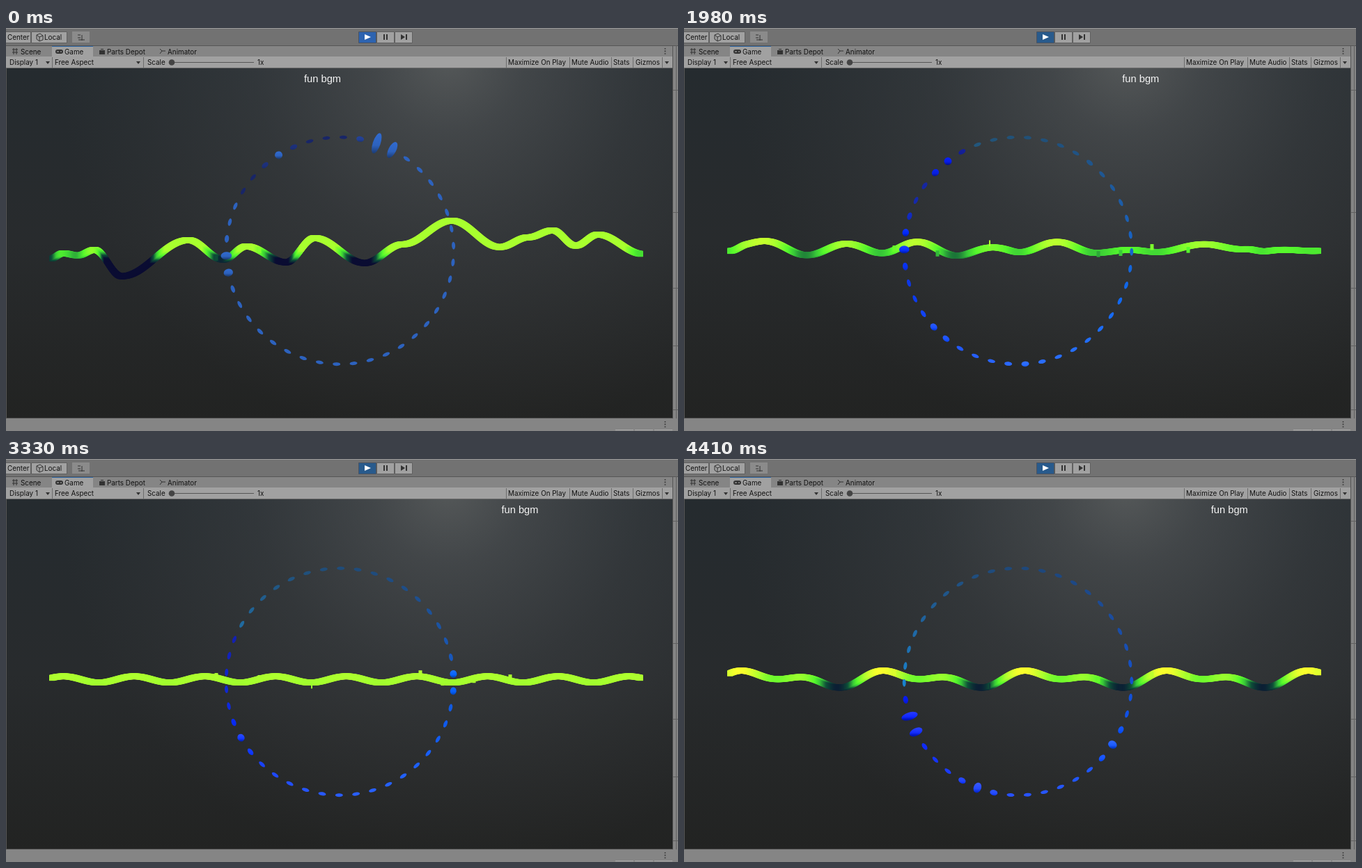
An HTML page with a canvas for the animation above (4500 ms loop, 965 by 580 pixels).

```html
<!DOCTYPE html>
<html lang="en">
<head>
<meta charset="utf-8">
<style>
html, body { margin: 0; width: 100%; height: 100%; overflow: hidden; background: #868686; }
canvas, svg { position: absolute; left: 0; top: 0; width: 965px; height: 580px; display: block; }
text { font: 9.9px Inter, sans-serif; fill: #111; }
#title { font: 14.7px "Liberation Sans", Arial, sans-serif; fill: #f4f4f4; }
</style>
</head>
<body>
<canvas id="scene" width="965" height="580"></canvas>
<svg viewBox="0 0 965 580">
  <path d="M0 0H965V58H0ZM0 562H965V580H0ZM957 25H965V580H957Z" fill="#858585"/>
  <path d="M0 0H965V25H0Z" fill="#727272"/>
  <path d="M0 0H965V1H0Z" fill="#9b9b9b"/>
  <path d="M0 25.5H965M957.5 25V562M0 561.5H957M.5 58V562" stroke="#555" fill="none"/>
  <path d="M66 26H125V42H66ZM0 41H957V57H0Z" fill="#a1a1a1"/>
  <path d="M-1 5.5H35.5V21.5H-1ZM36.5 5.5H87.5V21.5H36.5ZM532.5 5.5H557.5V21.5H532.5ZM558.5 5.5H583.5V21.5H558.5Z" fill="#a1a1a1" stroke="#606060"/>
  <path d="M95 5H120V21H95Z" fill="#8b8b8b"/>
  <path d="M0 57.5H957M66.5 42V57M197.5 42V57M718.5 42V57M809.5 42V57M869.5 42V57M900.5 42V57M942.5 42V57" stroke="#6c6c6c" fill="none"/>
  <path d="M958 89.5H965M958 265.5H965M958 374.5H965M958 457.5H965M958 549.5H965M962.5 25V562" stroke="#606060" fill="none"/>
  <path d="M66 26.5H125" stroke="#2d66a5"/>
  <path id="play" d="M506.5 5.5H531.5V21.5H506.5Z" stroke="#4a5360"/>
  <path d="M515 9L524 13L515 17Z" fill="#fff"/>
  <path d="M542 9H544V17H542ZM546 9H548V17H546ZM567 9L573 13L567 17ZM574 9H576V17H574Z" fill="#333"/>
  <path d="M57 48H63L60 52ZM187 48H193L190 52ZM946 48H952L949 52Z" fill="#333"/>
  <path d="M9 31H17M9 35H17M11 29V38M15 29V38M103 10H107M103 14H107M109 10V18M104 17H113M44 10L49 8L53 11V17L48 19L44 16ZM44 10L48 13L53 11M48 13V19M221 30L224 33L221 37M224 33H229" stroke="#333" fill="none"/>
  <path d="M134 32H142V38H134ZM136 30H140V31H136Z" fill="#333"/>
  <rect x="71" y="31" width="11" height="6" rx="3" fill="#333"/>
  <path d="M73 34H76M78 34H80" stroke="#bbb"/>
  <path d="M238 49.5H356" stroke="#555"/>
  <circle cx="238" cy="49.5" r="4.3" fill="#444"/>
  <path d="M946.5 29V38M946.5 566V575" stroke="#333" stroke-width="1.6" stroke-dasharray="1.6 2"/>
  <path d="M875 578.5H958" stroke="#aaa" stroke-dasharray="26 2"/>
  <text x="2" y="17">Center</text><text x="55" y="17">Local</text>
  <text x="21" y="37.5">Scene</text><text x="84" y="37.5">Game</text>
  <text x="145" y="37.5">Parts Depot</text><text x="232" y="37.5">Animator</text>
  <text x="5" y="53">Display 1</text><text x="70" y="53">Free Aspect</text>
  <text x="203" y="53">Scale</text><text x="361" y="53">1x</text>
  <text x="721" y="53">Maximize On Play</text><text x="812" y="53">Mute Audio</text>
  <text x="872" y="53">Stats</text><text x="904" y="53">Gizmos</text>
  <text id="title" y="78">fun bgm</text>
</svg>
<script>
const LOOP = 4500, STEP = 90, BEADS = 42, MID = 317;
const ctx = document.getElementById('scene').getContext('2d');
const title = document.getElementById('title');
const play = document.getElementById('play');
const mix = (a, b, u) => a + (b - a) * u;
const clamp = (v, a, b) => Math.min(b, Math.max(a, v));
const ease = u => (1 - Math.cos(Math.PI * u)) / 2;
const rand = n => { const v = Math.sin(n * 127.1) * 43758.5453; return v - Math.floor(v); };

// One crest of a periodic wave, highest at x = peak
const crest = (x, size, period, peak) => -size * Math.cos(2 * Math.PI * (x - peak) / period);

// Eased path through peaks and troughs
const through = points => x => {
  const i = clamp(points.findIndex(p => p[0] > x), 1, points.length - 1);
  const [x0, y0] = points[i - 1], [x1, y1] = points[i];
  return mix(y0, y1, ease(clamp((x - x0) / (x1 - x0), 0, 1)));
};

// wave: line height; gain, shift, top: how height becomes colour; humps: [bead, swelling]
const keys = [
  { t: 0, gain: 1.3, shift: -6, top: 311,
    wave: through([[63, 332], [82, 324], [103, 327], [127, 319], [166, 357], [262, 305], [312, 333], [345, 314],
      [402, 337], [443, 302], [515, 338], [570, 311], [640, 277], [709, 315], [750, 301], [785, 291],
      [818, 313], [850, 297], [915, 325]]),
    humps: [[40.4, 31], [34, 6], [26.6, 13]] },
  { t: 720, gain: .7, shift: 0, top: 300,
    wave: x => MID + crest(x, 3, 241, 62) + crest(x, 4, 120.5, 62),
    humps: [[39, 6], [34.3, 8], [23, 9]] },
  { t: 1440, gain: .9, shift: 0, top: 300,
    wave: x => MID + crest(x, 2.5, 203.5, 218) + crest(x, 5.5, 101.75, 218),
    humps: [[39, 6], [35.4, 5]] },
  { t: 2520, gain: .9, shift: 0, top: 300,
    wave: through([[62, 315], [90, 296], [175, 326], [252, 315], [285, 319], [335, 306], [403, 332], [470, 321],
      [527, 303], [590, 323], [652, 331], [725, 308], [805, 315], [838, 330], [915, 317]]),
    humps: [[40, 10], [34, 16], [28.7, 9], [23, 5]] },
  { t: 3330, gain: .15, shift: -6, top: 300,
    wave: x => MID + crest(x, 4.5, 101.5, 184),
    humps: [[35, 5], [17.4, 6]] },
  { t: 4050, gain: .7, shift: -2.5, top: 300,
    wave: x => MID + crest(x, 7, 67.8, 124),
    humps: [[16.7, 25]] },
  { t: 4410, gain: 1.3, shift: 0, top: 299,
    wave: x => MID - 1 + crest(x, 7.8, 203.5, 309) + crest(x, 6.25, 101.75, 279.4),
    humps: [[39.6, 23], [34, 10], [25, 8]] }
];
const tickX = [302, 364, 439, 595, 627, 672, 724];
const ramp = [[300, 255, 255, 44], [311, 168, 255, 46], [319, 85, 248, 44],
  [323, 56, 200, 56], [328, 14, 80, 56], [334, 10, 12, 50]];

function lineColor(h) {
  h = clamp(h, 300, 334);
  const i = Math.max(1, ramp.findIndex(s => s[0] >= h)), a = ramp[i - 1], b = ramp[i];
  const u = (h - a[0]) / (b[0] - a[0]);
  return `rgb(${[1, 2, 3].map(c => Math.round(mix(a[c], b[c], u)))})`;
}

function background() {
  const base = ctx.createLinearGradient(0, 58, 0, 562);
  base.addColorStop(0, '#252b2f');
  base.addColorStop(.5, '#282b2d');
  base.addColorStop(1, '#222322');
  ctx.fillStyle = base;
  ctx.fillRect(0, 58, 957, 504);
  const glow = ctx.createRadialGradient(635, 40, 0, 635, 40, 560);
  glow.addColorStop(0, 'rgba(94,97,97,.85)');
  glow.addColorStop(.2, 'rgba(86,89,91,.58)');
  glow.addColorStop(.5, 'rgba(78,81,84,.3)');
  glow.addColorStop(1, 'rgba(70,72,74,0)');
  ctx.fillStyle = glow;
  ctx.fillRect(0, 58, 957, 504);
}

// The line is a row of overlapping upright blocks
function line(a, b, u, t) {
  const s = ease(u), ripple = 4 * Math.sin(Math.PI * u);
  const y = x => mix(a.wave(x), b.wave(x), s) + ripple * Math.sin(x * .06 + t * .011);
  const gain = mix(a.gain, b.gain, s), shift = mix(a.shift, b.shift, s), top = mix(a.top, b.top, s);
  const block = (x, v, w) => {
    ctx.fillStyle = lineColor(Math.max(top, MID + (v - MID) * gain + shift));
    ctx.fillRect(x - w / 2, v - 4, w, 8.5);
  };
  for (let x = 66; x <= 911; x++) block(x, y(x), 8);
  const stray = 7 * Math.sin(Math.PI * t / 4410);
  tickX.forEach((x, i) => block(x, y(x) + stray * Math.sin(i * 2.3 + t * .003), x === 439 ? 2 : 5));
}

function bead(k, len, angle, fresh) {
  const low = (1 - Math.cos(angle)) / 2, big = clamp((len - 6) / 4, 0, 1);
  const dim = fresh * (1 - big) * (k > 30 && k < 40);
  const hue = mix(205 + 30 * k / 41, 218 + 12 * dim, fresh);
  const sat = mix(mix(56 + 16 * k / 41, 100, low) + 20 * big, 62, fresh);
  const light = mix(mix(30, 60 - 3 * k / 41, low) + 15 * big * (1 - low), 46 - 21 * dim, fresh);
  const tone = d => `hsl(${hue},${sat}%,${light + d}%)`;
  const x = 479.5 + 163.3 * Math.sin(angle), y = 320.5 - 163.3 * Math.cos(angle);
  const reach = Math.max(5, len / 2 * Math.abs(Math.cos(angle)));
  const shade = ctx.createLinearGradient(x, y - reach, x, y + reach);
  shade.addColorStop(0, tone(4 * big));
  shade.addColorStop(.6, tone(0));
  shade.addColorStop(1, tone(-18 * big));
  ctx.fillStyle = shade;
  ctx.beginPath();
  ctx.ellipse(x, y, 5.5, len / 2, angle, 0, 7);
  ctx.fill();
}

function ring(a, b, i, u, t) {
  const start = -31.7 + .0287 * t, fresh = clamp(1 - t / 400, 0, 1), pulse = Math.sin(Math.PI * u);
  const swell = (key, k) => key.humps.reduce((sum, [at, size]) => sum + size * Math.exp(-1.2 * (k - at) ** 2), 5);
  for (let k = 0; k < BEADS; k++) {
    const extra = 30 * pulse * Math.max(0, rand(k + 50 * i) - .8) * Math.abs(Math.sin(t * .008 + k));
    const angle = ((k + .5) * 360 / BEADS - start) * Math.PI / 180;
    bead(k, mix(swell(a, k), swell(b, k), u) + extra, angle, fresh);
  }
}

function draw(now) {
  const t = Math.floor(now % LOOP / STEP) * STEP;
  const i = keys.findLastIndex((key, n) => key.t <= t && n < keys.length - 1);
  const a = keys[i], b = keys[i + 1], u = (t - a.t) / (b.t - a.t);
  background();
  line(a, b, u, t);
  ring(a, b, i, u, t);
  title.setAttribute('x', 428 + 446 * (1 - Math.exp(-t / 3300)));
  play.setAttribute('fill', t ? '#285a8c' : '#2d63b0');
  requestAnimationFrame(draw);
}
requestAnimationFrame(draw);
</script>
</body>
</html>
```
